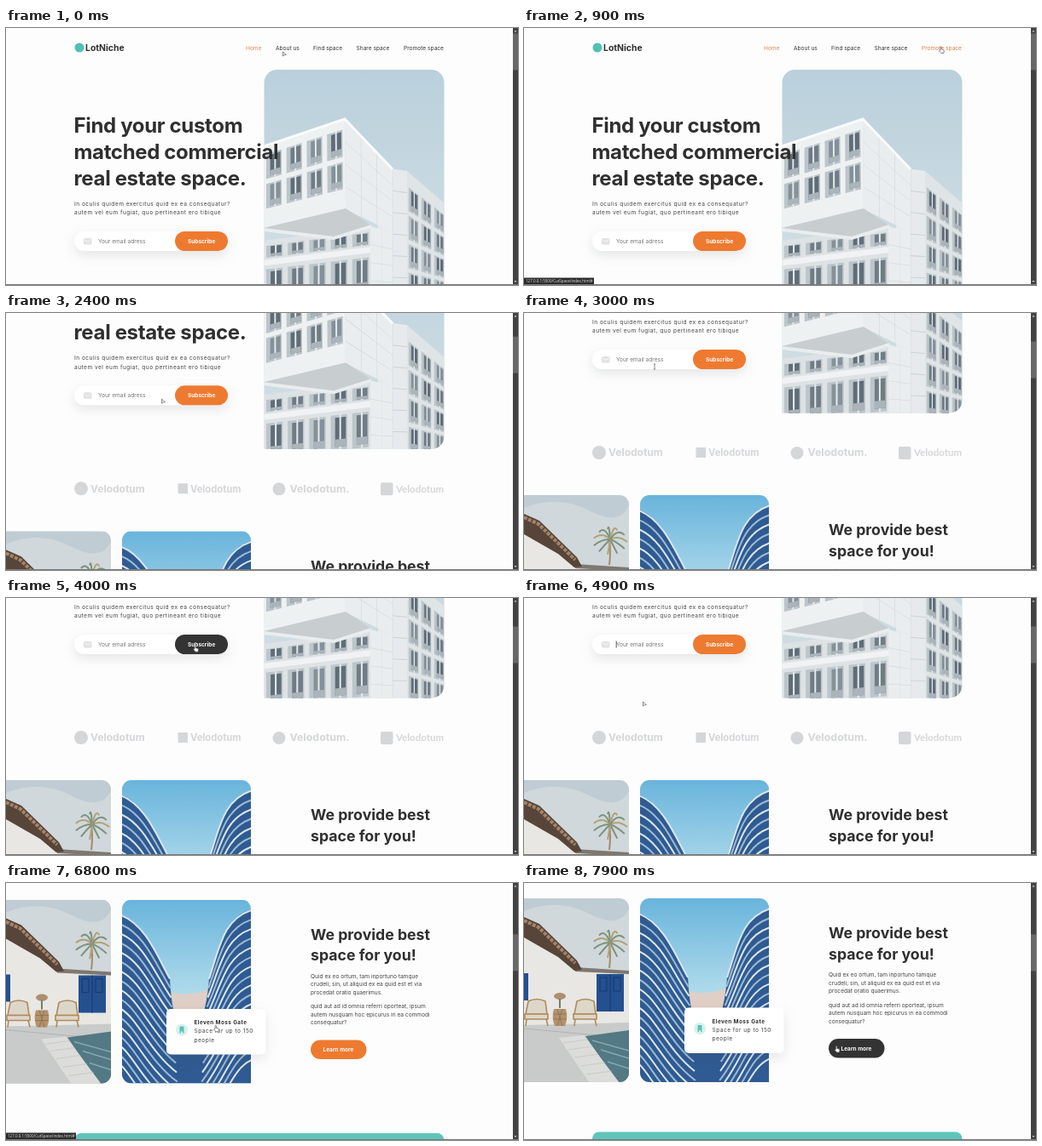
Write an HTML page that moves like this. It is 600x302 px and loops after 8000 ms.

```html
<!DOCTYPE html>
<html lang="en">
<head>
<meta charset="utf-8">
<title>Commercial space landing page</title>
<style>
  html, body { margin: 0; width: 100%; height: 100%; overflow: hidden; background: #fdfdfd; }
  svg { display: block; width: 600px; height: 302px; }
  text { font-family: Inter, "Open Sans", sans-serif; fill: #2f2f2f; white-space: pre; }
  .h1 { font-size: 24px; font-weight: 700; letter-spacing: -.34px; }
  .h2 { font-size: 17.7px; font-weight: 700; }
  .nav { font-size: 6.6px; fill: currentColor; color: #333; }
  .lead { font-size: 6.6px; letter-spacing: .47px; fill: #444; }
  .copy { font-size: 6.6px; fill: #444; }
  .btn { font-size: 6.5px; font-weight: 700; fill: #fff; }
  .field { font-size: 6.6px; fill: #777; }
  .logo { color: #d5d6d8; fill: currentColor; }
  .logo text { fill: currentColor; font-weight: 700; }
  .button { color: #ee7a30; }
  .button rect { fill: currentColor; }
  .status { font: 4.5px "Open Sans", sans-serif; fill: #e6e6e6; }
  .soft { filter: drop-shadow(0 5px 7px rgba(60, 70, 80, .13)); }
</style>
</head>
<body>
<svg viewBox="0 0 600 302">
  <defs>
    <linearGradient id="haze" x2="0" y2="1">
      <stop stop-color="#b9d0dc"/><stop offset="1" stop-color="#d5e0e5"/>
    </linearGradient>
    <linearGradient id="blue" x2="0" y2="1">
      <stop stop-color="#69b4dc"/><stop offset=".55" stop-color="#b5deec"/>
    </linearGradient>
    <clipPath id="heroClip"><path d="M302.5 313.5V64a15 15 0 0 1 15-15h181a15 15 0 0 1 15 15v234.500a15 15 0 0 1-15 15z"/></clipPath>
    <clipPath id="villaClip"><rect x="-30" y="410" width="153" height="216" rx="11"/></clipPath>
    <clipPath id="towerClip"><path d="M136 421a11 11 0 0 1 11-11h129a11 11 0 0 1 11 11V626H147a11 11 0 0 1-11-11z"/></clipPath>
  </defs>
  <rect width="600" height="302" fill="#fdfdfd"/>

  <g id="page">
    <circle cx="86" cy="23" r="5.500" fill="#4fc0b4"/>
    <text x="93" y="26.700" font-size="10.400" font-weight="700">LotNiche</text>
    <text class="nav" x="281" y="25.600" style="color:#e08757">Home</text>
    <text class="nav" id="about" x="316" y="25.600">About us</text>
    <text class="nav" id="find" x="360" y="25.600">Find space</text>
    <text class="nav" id="share" x="410.500" y="25.600">Share space</text>
    <text class="nav" id="promote" x="466" y="25.600">Promote space</text>

    <g clip-path="url(#heroClip)">
      <rect x="302" y="49" width="212" height="265" fill="url(#haze)"/>
      <g id="block"></g>
    </g>

    <text class="h1" x="79.500" y="122.800">Find your custom</text>
    <text class="h1" x="79.500" y="153.800">matched commercial</text>
    <text class="h1" x="79.500" y="184.500">real estate space.</text>
    <text class="lead" x="80" y="208.800">In oculis quidem exercitus quid ex ea consequatur?</text>
    <text class="lead" x="80" y="219.300">autem vel eum fugiat, quo pertineant ero tibique</text>

    <rect class="soft" x="80" y="239" width="180" height="23" rx="11.500" fill="#fff"/>
    <rect x="91" y="247" width="9.500" height="7.500" rx="1.500" fill="#e2e2e4"/>
    <path d="M92 248.500l3.800 2.800 3.800-2.800" fill="none" stroke="#fff" stroke-width=".8"/>
    <text class="field" x="108" y="252.700">Your email adress</text>
    <path id="caret" d="M108.200 246.500v8" stroke="#333" stroke-width=".8"/>
    <g class="button" id="subscribe">
      <rect x="198" y="239" width="62" height="23" rx="11.500"/>
      <text class="btn" x="213" y="252.800">Subscribe</text>
    </g>

    <g class="logo" id="logo1"><circle cx="88" cy="360" r="8"/><text x="99" y="364.300" font-size="12">Velodotum</text></g>
    <g class="logo" id="logo2"><rect x="201.500" y="354" width="11.500" height="12"/><text x="216" y="364.300" font-size="11.200">Velodotum</text></g>
    <g class="logo" id="logo3"><circle cx="320" cy="360.500" r="7.500"/><text x="332.500" y="364.300" font-size="12.400">Velodotum.</text></g>
    <g class="logo" id="logo4"><rect x="439" y="353" width="14.500" height="15" rx="2"/><text x="457" y="364.300" font-size="11.500" style="font-family:Lato,sans-serif">Velodotum</text></g>

    <g clip-path="url(#villaClip)">
      <rect y="410" width="124" height="217" fill="#bfccd4"/>
      <path d="M0 425q40-16 76 3t47-6v74H0z" fill="#d0d8dc"/>
      <path d="M0 450L40 477 60 494 123 499V565H0z" fill="#e8e7e3"/>
      <path d="M60 491l63 4v4l-63-3z" fill="#7f7770"/>
      <path d="M0 432l18 8 44 43 6 11-9 1-19-16L0 456z" fill="#57453a"/>
      <path d="M0 436l17 8 43 42" fill="none" stroke="#a58468" stroke-width="4" stroke-dasharray="4 1.500"/>
      <path d="M100 462q2 14 0 30" fill="none" stroke="#a58b68" stroke-width="2"/>
      <g id="palm" fill="none" stroke-width="2"></g>
      <path d="M0 498h5v32H0zM85 499h32v44H85z" fill="#24508f"/>
      <path d="M101 499v44M89 503h8v16h-8zM105 503h8v16h-8z" fill="none" stroke="#15386e"/>
      <path d="M0 559l123-3v71H0z" fill="#c9cbca"/>
      <path d="M0 563l75 7 48 2" fill="none" stroke="#b0b3b2"/>
      <path d="M72 572l51-7v62h-13z" fill="#527984"/>
      <path d="M80 577l43 12M90 588l33 10M98 602l25 8" stroke="#83a9b0" stroke-width="1.500"/>
      <path d="M41 574l29-3 42 56H77z" fill="#dcdddb"/>
      <path d="M46 580l28-4M52 588l28-4M59 597l28-4M66 607l29-4M73 617l30-4" stroke="#bfc2c1" stroke-width=".7"/>
      <g id="chair" fill="#ddd7ca" stroke="#b18a58" stroke-width="1.600">
        <path d="M5 531q10-5 20 0l2 15H2z"/><path d="M1 546h27v6H1zM3 552l-1 8M26 552l2 8"/>
      </g>
      <use href="#chair" x="57"/>
      <path d="M35 540h14q3 10-1 20H36q-4-10-1-20z" fill="#b3926c"/>
      <path d="M35 546h15M34 552h16M39 540l6 20M45 540l-6 20" stroke="#866a4b" stroke-width=".7"/>
      <ellipse cx="42" cy="525" rx="7" ry="4" fill="#ad8f70"/><path d="M42 528v11" stroke="#6f8062" stroke-width="2"/>
    </g>

    <g clip-path="url(#towerClip)">
      <rect x="136" y="410" width="151" height="217" fill="url(#blue)"/>
      <path d="M184 516Q212 528 246 512V590H184z" fill="#dfcfc7"/>
      <g id="tower" fill="none"></g>
    </g>

    <rect class="soft" x="188" y="538.500" width="116.500" height="53.500" rx="5" fill="#fff"/>
    <circle cx="206" cy="563" r="7" fill="#d8f1ed"/>
    <path d="M203.500 559h5v8h-1.500v-2h-2v2h-1.500z" fill="#5cc3b7"/>
    <text x="220.500" y="556.500" font-size="6.400" font-weight="700" letter-spacing=".4">Eleven Moss Gate</text>
    <text class="lead" x="220.500" y="566.500">Space for up to 150</text>
    <text class="lead" x="220.500" y="577">people</text>

    <text class="h2" x="357" y="457.300">We provide best</text>
    <text class="h2" x="357" y="481.800">space for you!</text>
    <g id="copy"></g>
    <g class="button" id="learn">
      <rect x="357" y="575" width="65.500" height="22.500" rx="11.250"/>
      <text class="btn" x="371.500" y="588.600">Learn more</text>
    </g>
    <rect x="80" y="684.500" width="433.500" height="180" rx="8" fill="#5fc5ba"/>
  </g>

  <rect x="594" width="6" height="302" fill="#424242"/>
  <path d="M595.500 4.500l1.500-2 1.500 2zM595.500 297l1.500 2 1.500-2z" fill="#ccc"/>
  <rect id="thumb" x="594" y="6.500" width="6" height="43" fill="#686868"/>
  <g id="status">
    <rect y="293.500" width="82" height="8.500" fill="#2b2b2b"/>
    <text class="status" x="2" y="299.300">127.0.0.1:5500/CutSpace/index.html#</text>
  </g>
  <rect y="301" width="600" height="1" fill="#777"/>

  <g id="cursor" stroke="#555" stroke-width=".7" stroke-linejoin="round" fill="#fff">
    <path id="arrow" d="M0 0v5l1.300-1.100 2.500-.4z"/>
    <path id="hand" d="M-1 3V-.5q.7-1 1.400 0V2l2.200.5q1 .3.800 1.500L3 6.500H0L-2.300 3.800q.3-.9 1.300-.8z"/>
    <path id="beam" d="M-1-3H1M0-3v6M-1 3H1" fill="none"/>
  </g>
</svg>

<script>
const $ = id => document.getElementById(id);
const lerp = (a, b, p) => a + (b - a) * p;
const clamp = p => Math.max(0, Math.min(1, p));

// Scenery: facades are four-corner faces divided in u (across) and v (down)
const poly = (pts, fill) => `<polygon points="${pts.join(' ')}" fill="${fill}"/>`;
const at = ([a, b, c, d], u, v) =>
  [0, 1].map(k => lerp(lerp(a[k], b[k], u), lerp(d[k], c[k], u), v).toFixed(1));
const pane = (face, u, v, w, h, fill) =>
  poly([at(face, u, v), at(face, u + w, v), at(face, u + w, v + h), at(face, u, v + h)], fill);

// Each bay is a shaded recess with off-centre glass, a mullion and a railing
function windows(face, cols, rows, top, bottom) {
  const glass = ['#5f6d78', '#84919a', '#6f7c86'];
  const w = 1 / cols, h = (bottom - top) / rows;
  let out = '';
  for (let r = 0; r < rows; r++) for (let c = 0; c < cols; c++) {
    const u = (c + .12) * w, v = top + r * h + h * .08;
    out += pane(face, u, v, w * .76, h * .84, '#bcc5ca')
      + pane(face, u + w * .2, v + h * .06, w * .5, h * .7, glass[(c * 2 + r) % 3])
      + pane(face, u + w * .4, v, w * .08, h * .84, '#e6eaec')
      + pane(face, u + w * .2, v + h * .58, w * .5, h * .18, '#aab4ba');
  }
  return out;
}

function joints(face, cols, rows) {
  let out = '';
  for (let c = 1; c < cols; c++) out += pane(face, c / cols, 0, .008, 1, '#cbd1d4');
  for (let r = 1; r < rows; r++) out += pane(face, 0, r / rows, 1, .006, '#cbd1d4');
  return out;
}

const upper = [[302, 139], [397, 107], [398, 213], [302, 235]];
const side = [[397, 107], [453, 166], [453, 240], [398, 213]];
const lower = [[302, 250], [428, 233], [428, 322], [302, 334]];
const wing = [[436, 163], [470, 168], [470, 318], [436, 318]];
const wingSide = [[470, 168], [515, 207], [515, 322], [470, 318]];
const pier = [[427, 233], [453, 240], [453, 318], [427, 318]];

$('block').innerHTML =
  poly(wing, '#e6eaec') + joints(wing, 2, 6) +
  poly(wingSide, '#dfe4e6') + windows(wingSide, 3, 4, .1, 1) +
  poly(lower, '#dde2e4') + windows(lower, 5, 1, .06, .26) + windows(lower, 5, 1, .36, .92) +
  pane(lower, 0, .27, 1, .08, '#f0f2f3') +
  poly(pier, '#e9edee') + joints(pier, 2, 4) +
  poly(side, '#e9edef') + joints(side, 3, 4) +
  poly(upper, '#eef1f2') + windows(upper, 4, 2, .08, .8) +
  poly([[302, 235], [398, 212], [428, 232], [384, 246]], '#c8cdd0') +
  poly([[302, 235], [384, 245], [428, 231], [428, 235], [384, 249], [302, 239]], '#e9edee') +
  '<path d="M302 139L397 107 453 166" fill="none" stroke="#fafbfb" stroke-width="3"/>';

const stroke = (d, color, width) => `<path d="${d}" stroke="${color}" stroke-width="${width}"/>`;
let bands = '<path d="M136 428C163 438 178 478 192 503Q195 560 212 580Q234 558 238 503C250 468 254 432 287 422V627H136z" fill="#2f5b92"/>';
for (let i = 0; i < 17; i++) {
  const y = 428 + i * 11, z = 422 + i * 11, color = i % 2 ? '#9dbad6' : '#dbe6ef';
  bands += stroke(`M134 ${y}C${163 - i} ${y + 10} ${178 - i} ${y + 50} ${192 + i * .8} ${y + 75}`, color, 2);
  bands += stroke(`M289 ${z}C${254 + i * .6} ${z + 10} ${250 + i * .6} ${z + 46} ${238 - i * .8} ${z + 81}`, color, 2);
}
$('tower').innerHTML = bands;

let fronds = '';
for (let i = 0; i < 11; i++) {
  const a = i / 11 * Math.PI * 2, x = 101 + 20 * Math.cos(a), y = 465 + 15 * Math.sin(a);
  fronds += stroke(`M101 462Q${(101 + x) / 2} ${y - 8} ${x} ${y}`, i % 3 ? '#7e927d' : '#b3a276', 2);
}
$('palm').innerHTML = fronds;

$('copy').innerHTML = [
  'Quid ex eo ortum, tam inportuno tamque', 'crudeli; sin, ut aliquid ex ea quid est et via',
  'procedat oratio quaerimus.', 'quid aut ad id omnia referri oporteat, ipsum',
  'autem nusquam hoc epicurus in ea commodi', 'consequatur?'
].map((s, i) => `<text class="copy" x="357" y="${502 + i * 9.5 + (i > 2 ? 7 : 0)}">${s}</text>`).join('');

// Motion
const GREY = [213, 214, 216], INK = [51, 51, 51], ORANGE = [224, 126, 66], FIRE = [238, 122, 48];
const hovers = [
  ['about', INK, ORANGE, [[100, 300]]],
  ['find', INK, ORANGE, [[300, 500]]],
  ['share', INK, ORANGE, [[500, 700], [1300, 1880]]],
  ['promote', INK, ORANGE, [[700, 1300]]],
  ['subscribe', FIRE, INK, [[3500, 4200]]],
  ['logo1', GREY, ORANGE, [[5100, 5350]]],
  ['logo2', GREY, ORANGE, [[5400, 5600], [6150, 6480]]],
  ['logo3', GREY, ORANGE, [[5650, 5800], [6050, 6130]]],
  ['logo4', GREY, ORANGE, [[5850, 6000]]],
  ['learn', FIRE, INK, [[7400, 8400]]]
];
const FADE = 200;
const glow = (t, [from, to]) => Math.min(clamp((t - from) / FADE), clamp(1 - (t - to) / FADE));

// time, x, y
const track = [
  [0, 324.5, 28], [150, 328, 23], [400, 376, 23], [600, 430, 23], [850, 489, 23], [1200, 488, 23],
  [1450, 440, 23], [1800, 425, 24], [1900, 270.5, 96], [2300, 190, 110], [2800, 153, 66], [3000, 153, 63],
  [3300, 160, 58], [3600, 222, 56], [4100, 222, 57], [4400, 130, 56], [4650, 130, 60], [4900, 139.5, 122],
  [5150, 122, 163], [5500, 238, 166], [5720, 358, 166], [5920, 474, 166], [6100, 370, 166],
  [6350, 246, 168], [7100, 246, 168.5], [7450, 364, 190], [7800, 366.5, 192.5], [8000, 366.5, 192.5]
];
const spans = {
  hand: [[100, 1850], [3500, 4200], [5100, 7150], [7400, 8000]],
  beam: [[2700, 3500], [4200, 4700]],
  status: [[200, 2200], [5200, 7300]]
};
const within = (t, list) => list.some(([a, b]) => t >= a && t < b);
const show = (id, on) => { $(id).style.visibility = on ? 'visible' : 'hidden'; };
const glide = (t, start) => 196 * (1 - (1 - clamp((t - start) / 500)) ** 3);

function draw(t) {
  const scroll = glide(t, 2200) + glide(t, 6400);
  $('page').setAttribute('transform', `translate(0 ${-scroll})`);
  $('thumb').setAttribute('y', 6.5 + scroll * 27 / 196);

  for (const [id, base, hot, times] of hovers) {
    const p = Math.max(...times.map(s => glow(t, s)));
    $(id).style.color = `rgb(${base.map((c, k) => Math.round(lerp(c, hot[k], p)))})`;
  }

  const i = track.findIndex(k => k[0] > t), a = track[i - 1], b = track[i];
  const p = (t - a[0]) / (b[0] - a[0]);
  $('cursor').setAttribute('transform', `translate(${lerp(a[1], b[1], p)} ${lerp(a[2], b[2], p)})`);
  const hand = within(t, spans.hand), beam = within(t, spans.beam);
  show('hand', hand);
  show('beam', beam);
  show('arrow', !hand && !beam);
  show('status', within(t, spans.status));
  show('caret', t >= 4500 && t < 6500 && Math.floor((t - 4500) / 500) % 2 === 0);
}

// The picture advances in steps of 100 ms
const start = performance.now();
function tick() {
  draw(Math.floor((performance.now() - start) % 8000 / 100) * 100);
  requestAnimationFrame(tick);
}
tick();
</script>
</body>
</html>
```
